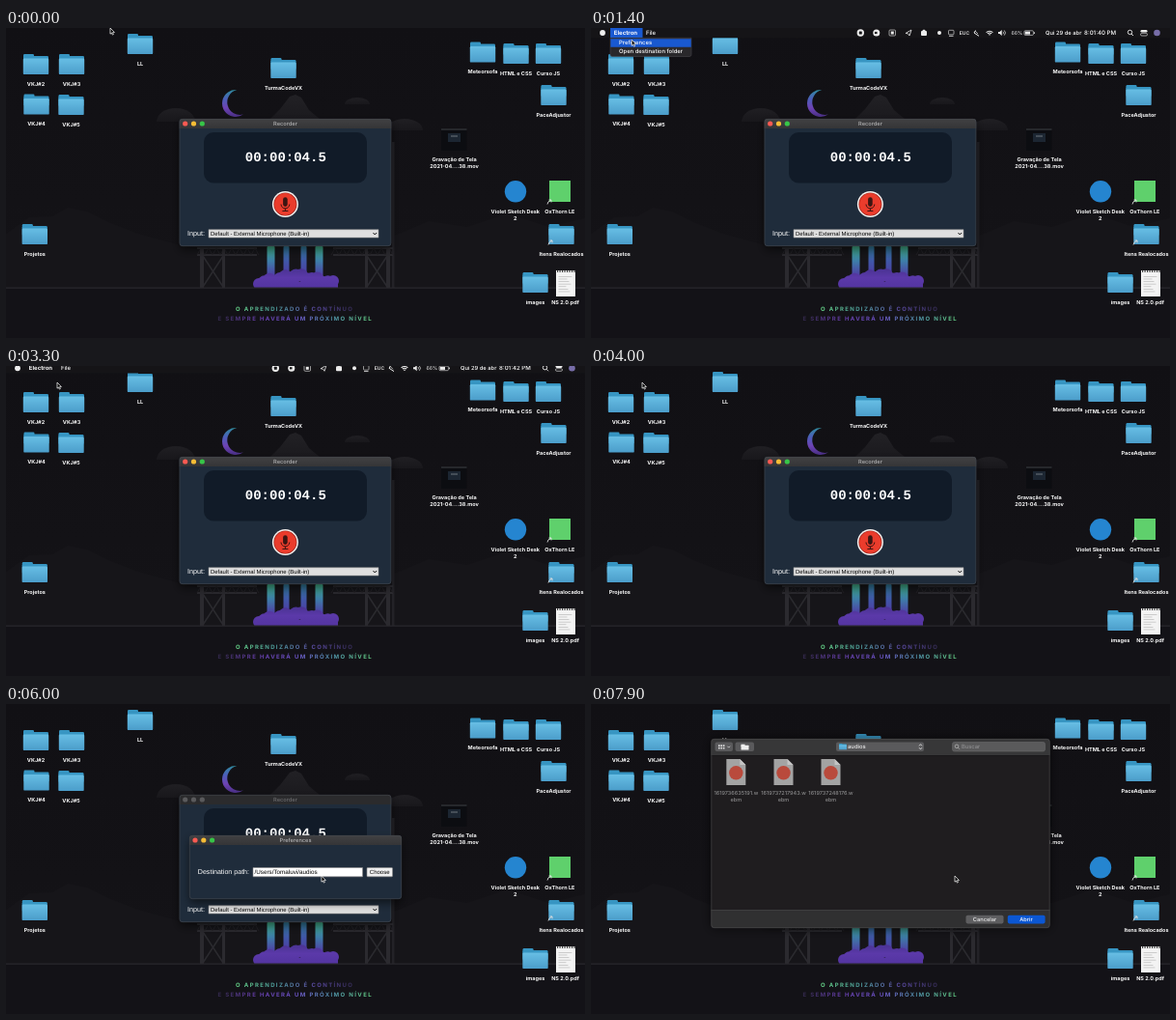
An HTML page with a canvas for the animation above (8000 ms loop, 600x321 px).

```html
<!DOCTYPE html>
<html lang="pt-BR">
<head>
<meta charset="utf-8">
<title>Recorder</title>
<style>
html, body { margin: 0; width: 100%; height: 100%; overflow: hidden; background: #121116; }
canvas { display: block; width: 600px; height: 321px; }
</style>
</head>
<body>
<canvas id="stage"></canvas>
<script>
const W = 600, H = 321, LOOP = 8000, STEP = 100;
const canvas = document.getElementById('stage');
const dpr = window.devicePixelRatio || 1;
canvas.width = W * dpr;
canvas.height = H * dpr;
const c = canvas.getContext('2d');
c.scale(dpr, dpr);
c.textRendering = 'geometricPrecision';

const UI = 'Inter, "Open Sans", sans-serif';
const WEB = '"Liberation Sans", Arial, sans-serif';
const MONO = '"Liberation Mono", "Courier New", monospace';

function rect(x, y, w, h, fill, r = 0, stroke) {
  c.beginPath();
  c.roundRect(x, y, w, h, r);
  if (fill) { c.fillStyle = fill; c.fill(); }
  if (stroke) { c.strokeStyle = stroke; c.lineWidth = 0.6; c.stroke(); }
}

function disc(x, y, r, fill) {
  c.beginPath();
  c.arc(x, y, r, 0, Math.PI * 2);
  c.fillStyle = fill;
  c.fill();
}

function trace(pts) {
  c.beginPath();
  pts.forEach(([x, y], i) => i ? c.lineTo(x, y) : c.moveTo(x, y));
}

function poly(pts, fill) {
  trace(pts);
  c.closePath();
  c.fillStyle = fill;
  c.fill();
}

function line(pts, color, width = 1) {
  trace(pts);
  c.strokeStyle = color;
  c.lineWidth = width;
  c.stroke();
}

function text(s, x, y, font, color = '#fff', align = 'left') {
  c.font = font;
  c.fillStyle = color;
  c.textAlign = align;
  c.textBaseline = 'middle';
  c.fillText(s, x, y);
}

function ramp(x0, y0, x1, y1, ...colors) {
  const g = c.createLinearGradient(x0, y0, x1, y1);
  colors.forEach((col, i) => g.addColorStop(i / (colors.length - 1), col));
  return g;
}

// Wallpaper

function moon() {
  c.beginPath();
  c.arc(238, 78, 14, 0.97, -1.49);
  c.arc(242.5, 76.8, 13.2, -1.83, 1.3, true);
  c.closePath();
  c.fillStyle = ramp(238, 64, 238, 92, '#2f8b9c', '#4b5fb8', '#6d43b4', '#4a2f86');
  c.fill();
}

function dome(x, base, rx, ry) {
  c.beginPath();
  c.ellipse(x, base, rx, ry, 0, Math.PI, 0);
  c.fillStyle = ramp(0, base - ry, 0, base, '#201f23', '#18171b');
  c.fill();
}

function hills() {
  dome(176, 97, 20, 14);
  dome(364, 79, 13, 7);
  dome(413, 106, 19, 12);
  poly([[268, 100], [284, 84], [294, 71], [300, 69], [306, 72], [314, 85], [332, 100]],
    ramp(0, 69, 0, 100, '#222125', '#19181c'));
  poly([[0, 213], [24, 196], [48, 195], [64, 186], [84, 190], [106, 201], [140, 214], [200, 230],
    [400, 216], [438, 200], [478, 206], [520, 192], [562, 206], [600, 197], [600, 269], [0, 269]], '#161519');
}

function scaffold() {
  const steel = '#2b2a2f';
  rect(198, 227, 62, 2, steel);
  rect(198, 234, 62, 2, steel);
  for (let x = 198; x < 256; x += 8) line([[x, 235], [x + 4, 228], [x + 8, 235]], '#252429', 0.8);
  rect(201, 227, 4, 42, steel);
  rect(224, 227, 3, 42, steel);
  line([[204, 236], [225, 268]], steel, 1.5);
  line([[225, 236], [204, 268]], steel, 1.5);
}

function plume() {
  for (const side of [-1, 1]) {
    rect(299.5 + side * 25 - 4, 226, 8, 32, ramp(0, 226, 0, 256, '#3fae86', '#3d7fa8', '#4f3fa5'), 1);
    rect(299.5 + side * 9 - 3, 226, 6, 32, ramp(0, 226, 0, 256, '#2f7896', '#3f58a8', '#4f3aa2'), 1);
  }
  const smoke = ramp(0, 248, 0, 269, '#47328f', '#5b39a9', '#5334a0');
  c.save();
  c.beginPath();
  c.rect(250, 240, 105, 29);
  c.clip();
  for (let i = 0; i < 15; i++) {
    const edge = Math.abs(i - 7) / 7;
    disc(262 + i * 5.5, 258 + edge * 7 - (i % 3) * 1.5, 7 - edge, smoke);
  }
  rect(258, 263, 86, 6, smoke);
  c.restore();
}

function slogan() {
  c.letterSpacing = '1.37px';
  text('O APRENDIZADO É CONTÍNUO', 238, 291, '700 6px ' + UI,
    ramp(238, 0, 360, 0, '#63cf83', '#4c9a9a', '#5949a0', '#332a52'));
  text('E SEMPRE HAVERÁ UM PRÓXIMO NÍVEL', 219.5, 301, '700 6px ' + UI,
    ramp(220, 0, 379, 0, '#33294c', '#633ca5', '#6b50c5', '#4e91a5', '#63cf83'));
  c.letterSpacing = '0px';
}

function wallpaper() {
  rect(0, 0, W, H, ramp(0, 0, 0, 269, '#111014', '#141317'));
  hills();
  moon();
  rect(400, 118, 2.5, 151, '#232227');
  scaffold();
  c.save();
  c.translate(599, 0);
  c.scale(-1, 1);
  scaffold();
  c.restore();
  plume();
  rect(0, 269, W, 52, '#131217');
  rect(0, 268.5, W, 1.2, '#28272c');
  slogan();
}

// Desktop icons

const label = (s, x, y) => text(s, x, y, '700 5.5px ' + UI, '#f8f8f8', 'center');

function folder(x, y, s = 1) {
  c.save();
  c.translate(x, y);
  c.scale(s, s);
  rect(-13, 0, 11, 6, '#3795c2', 1.2);
  rect(-13, 2, 26, 10, '#3795c2', 1.2);
  rect(-13.2, 4.5, 26.4, 16.6, ramp(0, 4, 0, 21, '#68bfe5', '#4b9dca'), 1.2);
  c.restore();
}

const folders = [
  ['LL', 139, 6], ['VKJ#2', 31, 27], ['VKJ#3', 68, 27], ['VKJ#4', 31.5, 68.5], ['VKJ#5', 67.5, 69],
  ['TurmaCodeVX', 287.5, 31], ['Meteorsofa', 494, 14.5], ['HTML e CSS', 528.5, 16],
  ['Curso JS', 562, 16], ['PaceAdjustor', 567.5, 59], ['Projetos', 29.8, 203],
  ['Itens Realocados', 575.5, 203], ['images', 548.5, 253]
];

function alias(x, y) {
  line([[x - 2, y + 2.5], [x - 1, y], [x + 2, y - 2]], '#ddd', 0.9);
  line([[x - 0.5, y - 2], [x + 2, y - 2], [x + 2, y + 0.5]], '#ddd', 0.9);
}

function desktop() {
  for (const [name, x, y] of folders) {
    folder(x, y);
    label(name, x, y + 31);
  }
  alias(564, 222);

  rect(451, 104, 26.5, 23, '#0c0d11');
  rect(451, 104, 26.5, 2, '#26282c');
  rect(458, 109, 13, 9, '#1c2632');
  rect(461, 111.5, 7, 1, '#6f777e');
  label('Gravação de Tela', 464.5, 136.4);
  label('2021-04....38.mov', 464.5, 143.3);

  disc(528, 169.3, 11.2, '#2585d0');
  label('Violet Sketch Desk', 527.8, 190.2);
  label('2', 527.8, 197.2);
  rect(563, 158, 22, 22, '#5fd06c');
  alias(563, 180);
  label('OxThorn LE', 573.8, 190.2);

  rect(570, 251, 20, 27, '#f3f3f3');
  for (let x = 571; x < 590; x += 2.5) rect(x, 251, 1.2, 2, '#444');
  for (let i = 0; i < 7; i++) rect(572.5, 257 + i * 2.6, 14 - (i * 5) % 7, 0.7, '#bbb');
  label('NS 2.0.pdf', 579.5, 284.6);
}

// Windows

function frameWindow(x, y, w, h, title, active) {
  c.save();
  c.shadowColor = 'rgba(0,0,0,.55)';
  c.shadowBlur = 10 * dpr;
  c.shadowOffsetY = 4 * dpr;
  rect(x, y, w, h, '#1f2c3b', 3);
  c.restore();
  rect(x, y, w, 10, active ? ramp(0, y, 0, y + 10, '#414143', '#353537') : '#2b2b2d', [3, 3, 0, 0]);
  rect(x + 0.3, y + 0.3, w - 0.6, h - 0.6, null, 3, '#45484e');
  const lights = active ? ['#fb5a52', '#f6bd35', '#37c548'] : ['#5a5a5c', '#5a5a5c', '#5a5a5c'];
  lights.forEach((col, i) => disc(x + 6 + i * 8.8, y + 5, 2.6, col));
  text(title, x + w / 2, y + 5.2, '500 5.7px ' + UI, active ? '#b4b4b5' : '#6d6d6f', 'center');
}

function micButton(x, y) {
  disc(x, y, 13.5, '#f5f1ef');
  disc(x, y, 12, '#8d231c');
  disc(x, y, 11.4, '#ea3c2c');
  const ink = '#3c1512';
  rect(x - 2.3, y - 7.2, 4.6, 9.6, ink, 2.3);
  c.beginPath();
  c.arc(x, y, 4.4, 0, Math.PI);
  c.strokeStyle = ink;
  c.lineWidth = 1;
  c.stroke();
  line([[x, y + 4.2], [x, y + 7]], ink);
  line([[x - 3, y + 7], [x + 3, y + 7]], ink);
}

function recorder(active) {
  frameWindow(179.7, 94, 219.5, 132, 'Recorder', active);
  rect(205, 108, 169, 52.5, '#111b28', 10);
  text('00:00:04.5', 289.8, 134.3, '700 14px ' + MONO, '#fff', 'center');
  micButton(289.4, 182.5);
  text('Input:', 188, 213, '7.2px ' + WEB);
  rect(210, 208.7, 176, 8.4, '#dfdfdf', 0, '#8d8d8d');
  text('Default - External Microphone (Built-in)', 212, 213, '5.95px ' + WEB, '#000');
  line([[380.5, 212], [382.3, 214], [384.1, 212]], '#111', 1);
}

function preferences() {
  frameWindow(190, 136, 220, 66, 'Preferences', true);
  text('Destination path:', 198.8, 174, '7.1px ' + WEB);
  rect(256, 169.5, 113.5, 9.3, '#fff', 0, '#8a8a8a');
  text('/Users/Tomaluvi/audios', 257.5, 174.2, '6.3px ' + WEB, '#000');
  rect(374, 169.5, 26.5, 9.3, '#f0f0f0', 0.8, '#8a8a8a');
  text('Choose', 387.2, 174.2, '6px ' + WEB, '#000', 'center');
}

function audioFile(x, id) {
  poly([[x - 10, 57], [x + 4, 57], [x + 10, 63], [x + 10, 84], [x - 10, 84]], '#a3a3a3');
  poly([[x + 4, 57], [x + 10, 63], [x + 4, 63]], '#c4c4c4');
  disc(x, 71.3, 7.2, '#b94a3c');
  const font = '500 5.5px ' + UI;
  text(id + '.w', x, 92.4, font, '#8b8b8c', 'center');
  text('ebm', x, 99.2, font, '#8b8b8c', 'center');
}

function fileDialog() {
  c.save();
  c.shadowColor = 'rgba(0,0,0,.6)';
  c.shadowBlur = 12 * dpr;
  rect(124.5, 36, 351, 196, '#1f1d1f', 3);
  c.restore();
  rect(124.5, 36, 351, 17, '#373738', [3, 3, 0, 0]);
  rect(124.5, 53, 351, 0.7, '#171718');
  rect(124.5, 213.5, 351, 18.5, '#303031', [0, 0, 3, 3]);
  rect(124.5, 213.3, 351, 0.7, '#464647');
  rect(124.8, 36.3, 350.4, 195.4, null, 3, '#4c4c4e');

  const chip = '#5a5a5c';
  rect(128.5, 39.5, 18.5, 9.5, chip, 2);
  for (let i = 0; i < 6; i++) rect(132 + (i % 3) * 2.4, 42.2 + (i > 2) * 2.6, 1.6, 1.8, '#ddd');
  line([[141.3, 43.7], [142.7, 45.1], [144.1, 43.7]], '#ddd', 0.8);
  rect(149.5, 39.5, 19.5, 9.5, chip, 2);
  rect(155.5, 41.7, 4, 2, '#eee');
  rect(155.5, 42.7, 8, 4.8, '#eee', 0.5);

  rect(254, 39.5, 91, 9.5, chip, 2);
  folder(261, 41, 0.3);
  text('audios', 266, 44.4, '500 5.9px ' + UI, '#eee');
  line([[340, 43.4], [341.5, 41.7], [343, 43.4]], '#eee', 0.8);
  line([[340, 45.2], [341.5, 46.9], [343, 45.2]], '#eee', 0.8);

  rect(374.5, 39.5, 96, 9.5, '#5a5a5b', 2, '#68686a');
  c.beginPath();
  c.arc(379, 43.8, 1.8, 0, 7);
  c.strokeStyle = '#bbb';
  c.lineWidth = 0.7;
  c.stroke();
  line([[380.3, 45.1], [382, 46.8]], '#bbb', 0.7);
  text('Buscar', 384, 44.4, '5.8px ' + UI, '#98989a');

  audioFile(150.3, '1619736635191');
  audioFile(199.5, '1619737217943');
  audioFile(248.5, '1619737248176');

  rect(388.5, 218.8, 39, 8.6, '#5e5e60', 1.8);
  text('Cancelar', 408, 223.2, '500 5.7px ' + UI, '#eee', 'center');
  rect(431.8, 218.8, 38.8, 8.6, '#0b57d3', 1.8);
  text('Abrir', 451, 223.2, '500 5.7px ' + UI, '#fff', 'center');
}

// Menu bar

function statusIcons() {
  const ink = '#ececec';
  disc(279.3, 5, 3.7, ink);
  rect(277.8, 3.5, 3, 3, '#161618', 0.5);
  disc(295.8, 5, 3.5, ink);
  rect(294, 3.9, 2.5, 2.2, '#161618');
  rect(309, 2, 6.5, 6, null, 1, ink);
  rect(310.8, 3.5, 3, 3, ink);
  line([[326, 5.5], [332, 2], [330, 8], [328.5, 5.8], [326, 5.5]], ink, 0.8);
  rect(342, 3, 6, 5, ink, 1);
  rect(343.5, 1.7, 3, 2, ink, 1);
  disc(361, 5, 2, ink);
  rect(370.5, 2.3, 5.5, 4.5, null, 0.8, ink);
  line([[371, 8.3], [375.5, 8.3]], ink, 0.8);
  text('EUC', 387, 5.2, '600 5px ' + UI, ink, 'center');
  line([[398.5, 2.5], [397, 5], [402, 8.3]], ink, 1);
  line([[398, 3], [401, 6]], ink, 0.7);
  for (const r of [1.2, 3, 4.8]) {
    c.beginPath();
    c.arc(413, 8, r, Math.PI * 1.25, Math.PI * 1.75);
    c.strokeStyle = ink;
    c.lineWidth = 1.1;
    c.stroke();
  }
  poly([[422, 4], [423.5, 4], [425.7, 2], [425.7, 8], [423.5, 6], [422, 6]], ink);
  for (const r of [1.8, 3.6]) {
    c.beginPath();
    c.arc(425.7, 5, r, -0.8, 0.8);
    c.lineWidth = 0.7;
    c.stroke();
  }
  text('66%', 435.5, 5.2, '5.2px ' + UI, ink);
  rect(449, 2.8, 9.4, 4.6, null, 1, ink);
  rect(449.8, 3.6, 5.2, 3, ink);
  rect(459, 4.2, 0.8, 1.8, ink);
  c.beginPath();
  c.arc(558.5, 4.4, 2.2, 0, 7);
  c.lineWidth = 0.9;
  c.stroke();
  line([[560, 6], [562, 8]], ink, 0.9);
  rect(569.5, 2, 7, 2.6, ink, 1.3);
  rect(569.5, 5.4, 7, 2.6, null, 1.3, ink);
  disc(586.5, 5, 3.3, '#776da8');
}

function menuBar(shown, t, open) {
  c.save();
  c.translate(0, (shown - 1) * 10.5);
  rect(0, 0, W, 10.3, '#151417');
  if (open) rect(20, 0, 33.5, 10.3, '#1959d1');
  disc(12, 5, 2.9, '#efefef');
  text('Electron', 23.8, 5.2, '700 6px ' + UI);
  text('File', 57, 5.2, '500 6px ' + UI);
  statusIcons();
  text('Qui 29 de abr', 471, 5.2, '500 5.8px ' + UI);
  text(`8:01:${39 + Math.floor(t / 1000)} PM`, 511, 5.2, '500 6.1px ' + UI);
  c.restore();
}

function dropdown(active) {
  rect(20, 10.3, 84, 19.2, '#29282b', [0, 0, 2, 2], '#47464a');
  if (active >= 0) rect(20.3, 11.2 + active * 8.5, 83.4, 8.5, '#1959d1');
  text('Preferences', 29, 15.7, '500 5.9px ' + UI);
  text('Open destination folder', 29, 24, '500 5.9px ' + UI);
}

// Motion

const path = [
  [0, 108, 0], [200, 104, 0], [800, 38, 3], [1000, 38, 4], [1300, 42, 12], [1800, 43, 13],
  [2200, 52, 21], [2700, 52, 21], [3000, 53, 17], [4300, 53, 17], [5000, 324, 178],
  [5900, 324, 178], [6600, 377, 178], [LOOP, 377, 178]
];

const ease = u => u * u * (3 - 2 * u);
const progress = (t, a, b) => ease(Math.min(1, Math.max(0, (t - a) / (b - a))));

function pointer(t) {
  const i = path.findIndex(k => k[0] > t);
  const [t0, x0, y0] = path[i - 1], [t1, x1, y1] = path[i];
  const u = progress(t, t0, t1);
  return [x0 + (x1 - x0) * u, y0 + (y1 - y0) * u];
}

function drawPointer(x, y) {
  const shape = [[0, 0], [0, 6.2], [1.4, 5], [2.4, 7.1], [3.4, 6.6], [2.5, 4.6], [4.4, 4.5]];
  const pts = shape.map(([dx, dy]) => [x + dx, y + dy]);
  poly(pts, '#090909');
  line([...pts, pts[0]], '#f2f2f2', 0.75);
}

function draw(t) {
  const [x, y] = pointer(t);
  const prefs = t >= 4200;
  const open = t >= 1000 && t < 3200;
  const bar = progress(t, 200, 500) - progress(t, 3200, 3500);
  wallpaper();
  desktop();
  recorder(!prefs);
  if (prefs) preferences();
  if (t >= 7500) fileDialog();
  if (bar > 0) menuBar(bar, t, open);
  if (open) dropdown(y < 10.5 ? -1 : y < 19.7 ? 0 : 1);
  drawPointer(x, y);
}

let last = -1;
const start = performance.now();
function tick() {
  const t = Math.floor((performance.now() - start) % LOOP / STEP) * STEP;
  if (t !== last) draw(last = t);
  requestAnimationFrame(tick);
}
tick();
</script>
</body>
</html>
```
